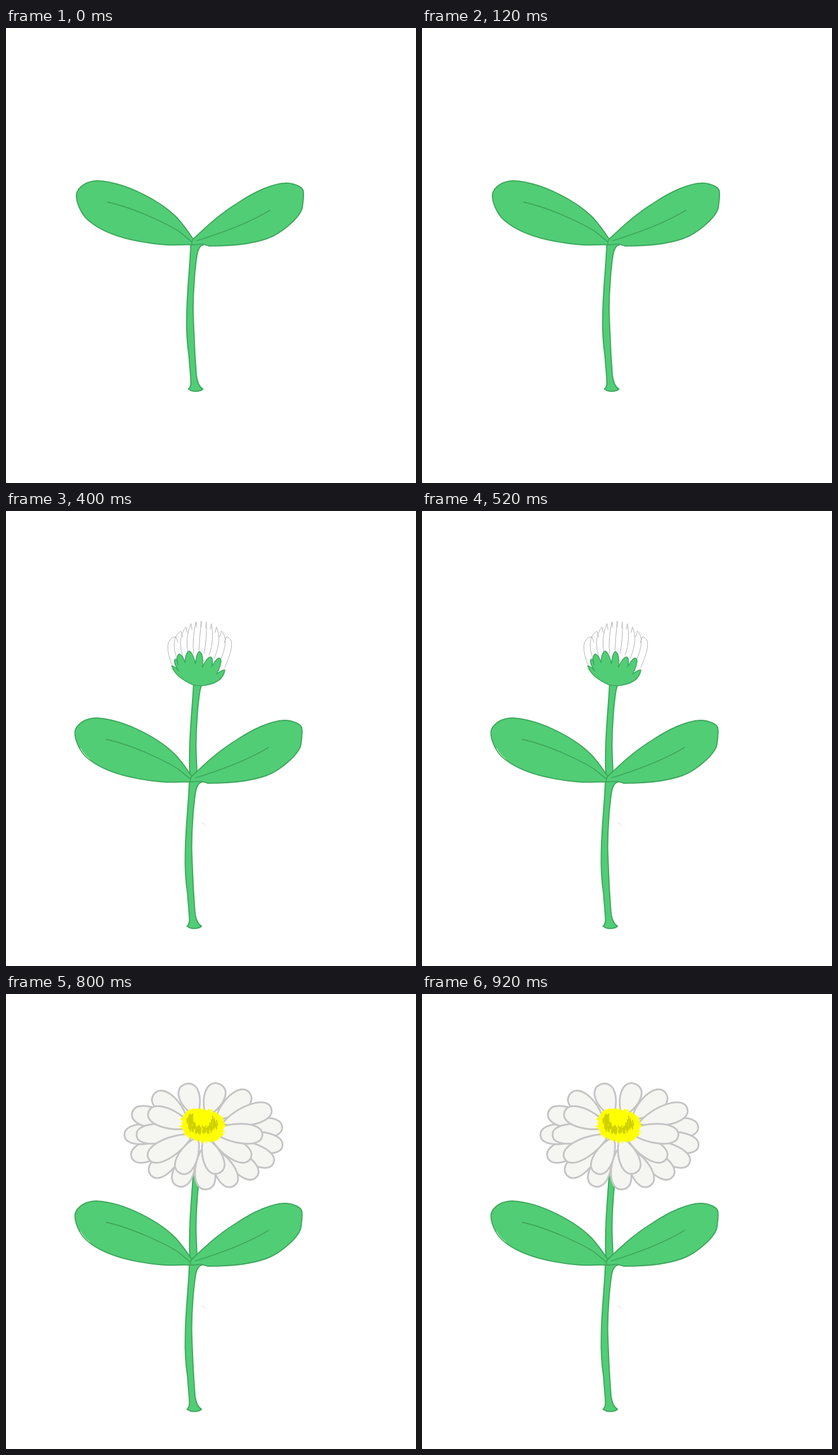
Write an HTML page with a canvas that moves like this. It is 710 px wide and 789 px high and loops after 1 s.

```html
<!DOCTYPE html>
<html>
<head>
<meta charset="utf-8">
<title>Growing daisy</title>
<style>
  html, body { margin: 0; width: 100%; height: 100%; overflow: hidden; background: #fff; }
  canvas { display: block; }
</style>
</head>
<body>
<canvas id="stage" width="710" height="789"></canvas>
<script>
const ctx = document.getElementById('stage').getContext('2d');
const { PI, sin, cos } = Math;
const GREEN = '#51cd76', EDGE = '#3fa75c';

const leftLeaf = 'M324 366C316 354 306 340 297 330C270 302 210 268 160 265C142 264 124 275 122 289C121 303 131 323 141 332C176 364 240 373 278 376C292 377 308 375 322 376';
const rightLeaf = 'M324 366C345 347 370 322 402 303C430 284 465 268 487 269C500 270 514 275 515 284C516 292 514 305 513 312C509 328 482 351 462 361C435 374 395 378 352 378C346 377 344 374 336 375L322 376';
const veins = 'M176 302C220 311 280 340 300 353L322 371M330 369C375 355 425 336 457 316M322 376Q321 369 326 364';
const stem = 'M320 376C319 410 313 460 313 500C312 530 314 550 317 570C318 590 321 610 320 618Q319 624 316 626Q321 630 328 630Q337 630 341 626Q333 622 330 605C327 570 325 520 324 490C324 450 328 410 331 392Q334 377 342 376';
const calyx = 'M287 269Q290 267 299 277Q290 264 292 258Q296 254 298 267Q294 251 300 248Q306 250 310 263Q311 245 317 243Q323 244 328 265' +
  'Q330 245 335 244Q343 248 340 271Q348 254 354 253Q360 255 356 270Q364 256 369 255Q377 257 365 283Q376 274 379 276' +
  'Q375 300 338 303L325 302Q293 288 287 269Z';
const sepals = 'M245 252Q246 247 250 249Q256 262 265 275Q275 288 294 291Q281 270 283 250Q286 243 290 249Q297 285 322 298Q316 280 318 262' +
  'Q321 255 325 262Q328 285 335 294Q352 284 361 264Q366 259 368 266Q366 282 350 295Q380 298 395 273Q399 269 400 275' +
  'Q398 288 388 295Q404 293 412 284Q417 281 418 286Q405 306 385 308Q360 311 338 308L328 304Q310 308 296 307Q262 292 245 252Z';

function paint(d, fill, line, width) {
  const path = new Path2D(d);
  if (fill) { ctx.fillStyle = fill; ctx.fill(path); }
  if (line) { ctx.strokeStyle = line; ctx.lineWidth = width; ctx.stroke(path); }
}

// A rounded petal from base (x, y) to tip (tx, ty)
function petal(x, y, tx, ty, half, fill, line) {
  const len = Math.hypot(tx - x, ty - y), w = half * 1.14, t = w * 1.33;
  ctx.save();
  ctx.translate(x, y);
  ctx.rotate(Math.atan2(ty - y, tx - x));
  paint(`M0 0C${len * 0.3} ${-w} ${len} ${-t} ${len} 0C${len} ${t} ${len * 0.3} ${w} 0 0`, fill, line, 3);
  ctx.restore();
}

function sprout(dx, dy, leafy = true) {
  ctx.save();
  ctx.translate(dx, dy);
  paint(stem, GREEN, EDGE, 2);
  if (leafy) {
    paint(leftLeaf, GREEN, EDGE, 2);
    paint(rightLeaf, GREEN, EDGE, 2);
    paint(veins, null, EDGE, 1.8);
  }
  ctx.restore();
}

function plant(leafyTop) {
  ctx.save();
  ctx.beginPath();
  ctx.rect(0, 0, 710, 460);
  ctx.clip();
  sprout(5, -81, leafyTop);
  ctx.restore();
  sprout(-2.5, 94);
  paint('M129 412Q135 423 145 430', null, '#fff', 0.8);
  paint('M340 542h2M343.5 545h1.5', null, '#ccc', 1);
}

function bud() {
  let d = '';
  for (let i = -5; i <= 5; i++) {
    const u = i / 5;
    d += `M${334 + 45 * u} ${246 + 25 * u * u}Q${335 + 66 * u} 222 ${338 + 44 * u} ${191 + 27 * u * u}l${-4 * u} 10`;
  }
  paint(d, null, '#b0b0b0', 1);
  paint(calyx, GREEN, EDGE, 1.6);
}

function opening() {
  const fill = '#efefef', line = '#cecece';
  const row = (tips, top, half, pull) => tips.forEach(x => {
    const off = x - 331;
    petal(331 + off * pull, 293 - 30 * pull, x, top + off * off / 500, half, fill, line);
  });
  petal(412, 288, 450, 244, 9, fill, line);
  row([243, 274, 316, 368, 411], 182, 13, 0.6);
  paint('M247 250Q262 285 300 300H375L414 284L424 240L331 220Z', fill);
  row([232, 431, 261, 295, 384, 350], 187, 15, 0.42);
  paint(sepals, GREEN, GREEN, 1.5);
}

// Petal on an elliptical ring, starting part of the way from the heart
function ringPetal(angle, cy, rx, ry, start, half) {
  const tx = 335 + rx * cos(angle), ty = cy + ry * sin(angle);
  petal(338 + (tx - 338) * start, 236 + (ty - 236) * start, tx, ty, half, '#f5f6f2', '#c4c4c4');
}

function flower() {
  for (let i = 0; i < 16; i++) {
    const step = i * PI / 8;
    const angle = step - 0.3 + 0.23 * cos(step + 0.47);   // closer together at the lower left
    const size = 0.98 + 0.09 * cos(step - 1.18);          // longer at the lower right
    ringPetal(angle, 240, 142 * size, 95 * size, 0.3, 17.5);
  }
  for (const i of [1, 3, 5, 0, 2, 4, 6]) ringPetal(i * PI / 5, 245, 109, 69, 0.16, 17);
  heart();
}

function scribble(count, color, stroke) {
  let seed = 7;
  const rnd = () => (seed = seed * 16807 % 2147483647) / 2147483647 - 0.5;
  let d = '';
  for (let i = 0; i < count; i++) d += stroke(i / count, rnd);
  paint(d, null, color, 2);
}

function heart() {
  ctx.save();
  ctx.translate(341, 228);
  ctx.rotate(0.18);
  paint('M-36 -4C-36 -31 -12 -27 4 -27C28 -27 36 -20 36 2C36 24 20 26 2 26C-22 26 -36 22 -36 -4Z', '#ff0');
  scribble(95, '#ff0', (u, rnd) => {
    const a = u * 2 * PI, r = 1.04 + rnd() * 0.16, b = a + rnd() * 0.25;
    return `M${30 * cos(a)} ${23 * sin(a)}L${36 * r * cos(b)} ${27 * r * sin(b)}`;
  });
  ctx.restore();
  scribble(80, '#d0d000', (u, rnd) => {
    const a = 3.8 - u * 4, x = 340 + 22 * cos(a) + rnd() * 10, y = 221 + 15 * sin(a) + rnd() * 6;
    return `M${x} ${y - 5}l${rnd() * 5} 9`;
  });
}

const stages = [
  () => sprout(0, 0),
  () => {
    plant(true);
    paint('M330.5 360v8M329.5 376v10', null, '#fff', 1);
  },
  () => { plant(false); bud(); },
  () => { plant(false); opening(); },
  () => { plant(false); flower(); }
];

ctx.lineJoin = ctx.lineCap = 'round';
let shown = -1;
function tick() {
  const now = Math.floor(performance.now() % 1000 / 200);
  if (now !== shown) {
    shown = now;
    ctx.clearRect(0, 0, 710, 789);
    stages[now]();
  }
  requestAnimationFrame(tick);
}
tick();
</script>
</body>
</html>
```
